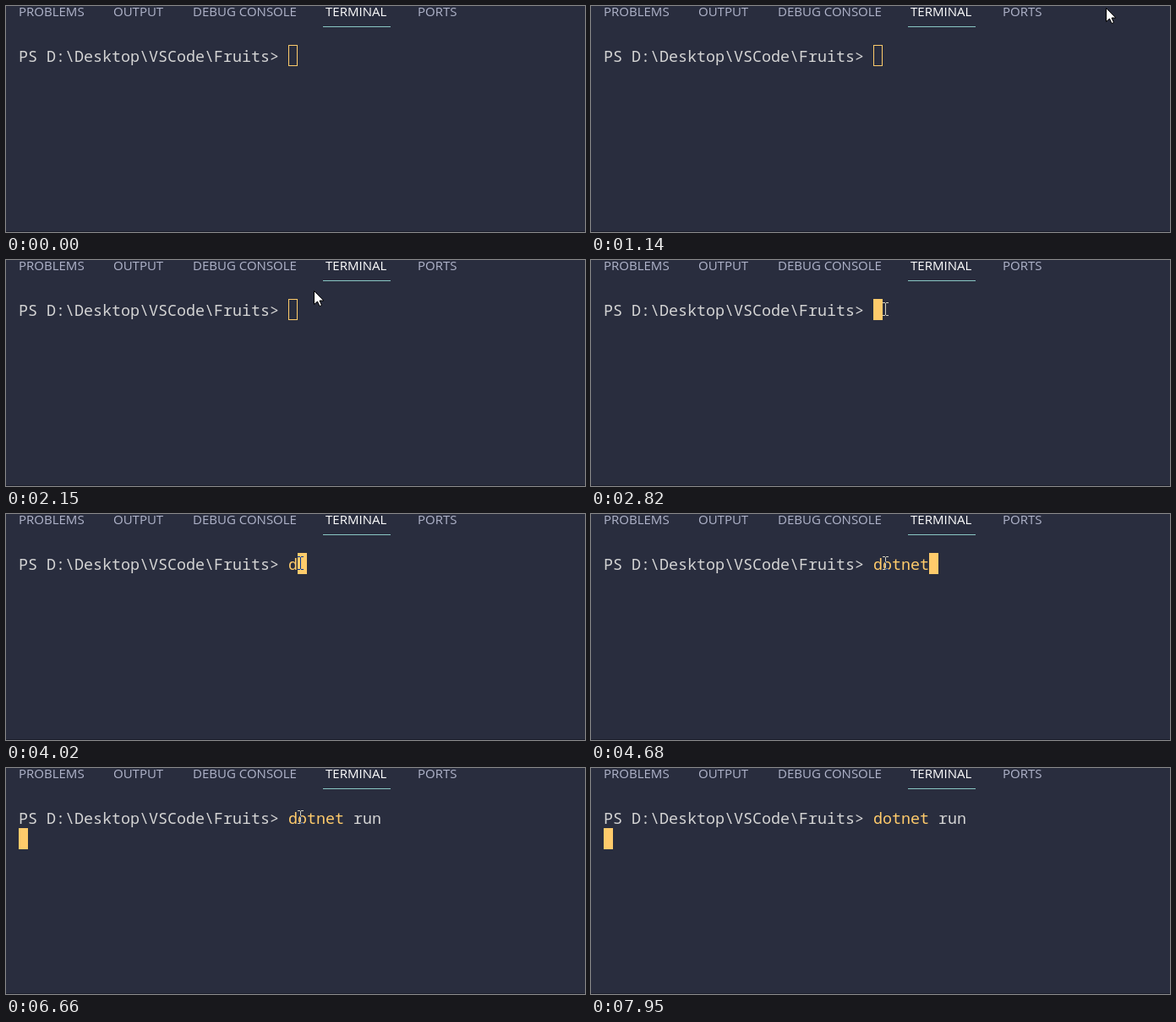
These frames come from a looping animation (685 by 267 pixels, 8 s). An HTML page with a canvas:

```html
<!DOCTYPE html>
<html lang="en">
<head>
<meta charset="utf-8">
<title>Terminal</title>
<style>
  html, body { margin: 0; width: 100%; height: 100%; overflow: hidden; background: #292d3e; }
  canvas { display: block; width: 685px; height: 267px; }
</style>
</head>
<body>
<canvas id="stage" width="685" height="267"></canvas>
<script>
const ctx = document.getElementById('stage').getContext('2d');
const LOOP = 8000, TICK = 70;
const CELL = 11, LEFT = 15, ROW = 46, ROW_H = 25;

const COLOR = {
  back: '#292d3e', edge: '#1b1e2b', text: '#d4d4d4', tab: '#b0b4ca',
  active: '#ffffff', line: '#8ac8c5', gold: '#ffcb6b', red: '#ff5572', green: '#c3e88d'
};
const TAB_FONT = '15px "Open Sans", "Noto Sans", sans-serif';
const MONO_FONT = '500 18.33px "Noto Sans Mono", "DejaVu Sans Mono", monospace';

const TABS = [['PROBLEMS', 15], ['OUTPUT', 127], ['DEBUG CONSOLE', 221], ['TERMINAL', 378], ['PORTS', 487]];
const PROMPT = 'PS D:\\Desktop\\VSCode\\Fruits';
const COMMAND = 'dotnet run';
const FOCUS = 2820, TYPING = 4020, KEY_GAP = 132, ENTER = 6660;

// Each pointer move is a Bezier curve, sampled once per tick.
const MOVES = [
  { at: 330, steps: 2, curve: [[576, 236], [581, 227]] },
  { at: 590, steps: 5, curve: [[589, 220], [635, 95], [560, 43]] },
  { at: 1070, steps: 2, curve: [[585, 22], [609, 2]] },
  { at: 1730, steps: 7, curve: [[596, 6], [480, 18], [364, 36]] },
  { at: 2290, steps: 5, curve: [[361, 38], [349, 44], [345, 50]] },
  { at: 7670, steps: 4, curve: [[347, 31], [310, 12], [221, 1]] }
];
const LEAVE = 7950;

function rect(x, y, w, h, color) {
  ctx.fillStyle = color;
  ctx.fillRect(x, y, w, h);
}

function write(str, x, y, font, color) {
  ctx.font = font;
  ctx.fillStyle = color;
  ctx.fillText(str, x, y);
}

function type(str, col, color) {
  [...str].forEach((ch, i) => write(ch, LEFT + (col + i) * CELL, 66, MONO_FONT, color));
}

function drawPanel() {
  rect(0, 0, 685, 267, COLOR.back);
  rect(0, 266, 685, 1, COLOR.edge);
  for (const [name, x] of TABS) {
    const active = name === 'TERMINAL';
    write(name, x, 12, (active ? '500 ' : '') + TAB_FONT, active ? COLOR.active : COLOR.tab);
  }
  rect(375, 24, 80, 1, COLOR.line);
}

function drawShell(t) {
  const keys = Math.floor((t - TYPING) / KEY_GAP) + 1;
  const typed = Math.max(0, Math.min(COMMAND.length, keys));
  const start = PROMPT.length + 2;
  // A lone "do" reads as an unfinished keyword.
  const partial = typed === 2;
  type(PROMPT, 0, COLOR.text);
  type('>', PROMPT.length, partial ? COLOR.red : COLOR.text);
  type(COMMAND.slice(0, Math.min(typed, 6)), start, partial ? COLOR.green : COLOR.gold);
  type(COMMAND.slice(6, Math.max(typed, 6)), start + 6, COLOR.text);

  const done = t >= ENTER;
  const x = done ? LEFT : LEFT + (start + typed) * CELL;
  const y = done ? ROW + ROW_H : ROW;
  if (t >= FOCUS) {
    rect(x, y, CELL, ROW_H, COLOR.gold);
  } else {
    ctx.strokeStyle = COLOR.gold;
    ctx.lineWidth = 1;
    ctx.strokeRect(x + 0.5, y + 0.5, CELL - 1, ROW_H - 1);
  }
}

function drawBeam(x, y) {
  ctx.globalCompositeOperation = 'difference';
  for (const edge of [0, 15]) {
    rect(x, y + edge, 3, 1, '#fff');
    rect(x + 4, y + edge, 3, 1, '#fff');
  }
  rect(x + 3, y + 1, 1, 14, '#fff');
  ctx.globalCompositeOperation = 'source-over';
}

function drawOutline(x, y, points) {
  ctx.beginPath();
  for (const [px, py] of points) ctx.lineTo(x + px + 0.5, y + py + 0.5);
  ctx.closePath();
  ctx.fillStyle = '#fff';
  ctx.fill();
  ctx.strokeStyle = '#000';
  ctx.lineWidth = 1;
  ctx.stroke();
}

function drawArrow(x, y) {
  drawOutline(x, y, [[0, 0], [0, 16], [4, 12.5], [6.5, 18], [9, 17], [6.5, 11.5], [11.3, 11.5]]);
}

function drawHand(x, y) {
  drawOutline(x, y, [[-1, 0], [2, 0], [2, 6], [11, 8], [11, 15], [8, 21], [-1, 21], [-6, 12], [-4, 10], [-1, 13]]);
}

function bezier(points, u) {
  if (points.length === 1) return points[0];
  const next = points.slice(1).map(([x, y], i) => {
    const [px, py] = points[i];
    return [px + (x - px) * u, py + (y - py) * u];
  });
  return bezier(next, u);
}

function overTab(x, y) {
  ctx.font = TAB_FONT;
  return y < 25 && TABS.some(([name, left]) => x >= left && x <= left + ctx.measureText(name).width);
}

function drawPointer(t) {
  const move = MOVES.filter(m => t >= m.at).pop();
  if (!move || t >= LEAVE) return;
  const step = Math.min(move.steps - 1, Math.floor((t - move.at) / TICK));
  const [x, y] = bezier(move.curve, step / (move.steps - 1)).map(Math.round);
  const draw = y > 43 ? drawBeam : overTab(x, y) ? drawHand : drawArrow;
  draw(x, y);
}

function frame(now) {
  const t = Math.max(0, now) % LOOP;
  drawPanel();
  drawShell(t);
  drawPointer(t);
  requestAnimationFrame(frame);
}

requestAnimationFrame(frame);
</script>
</body>
</html>
```
